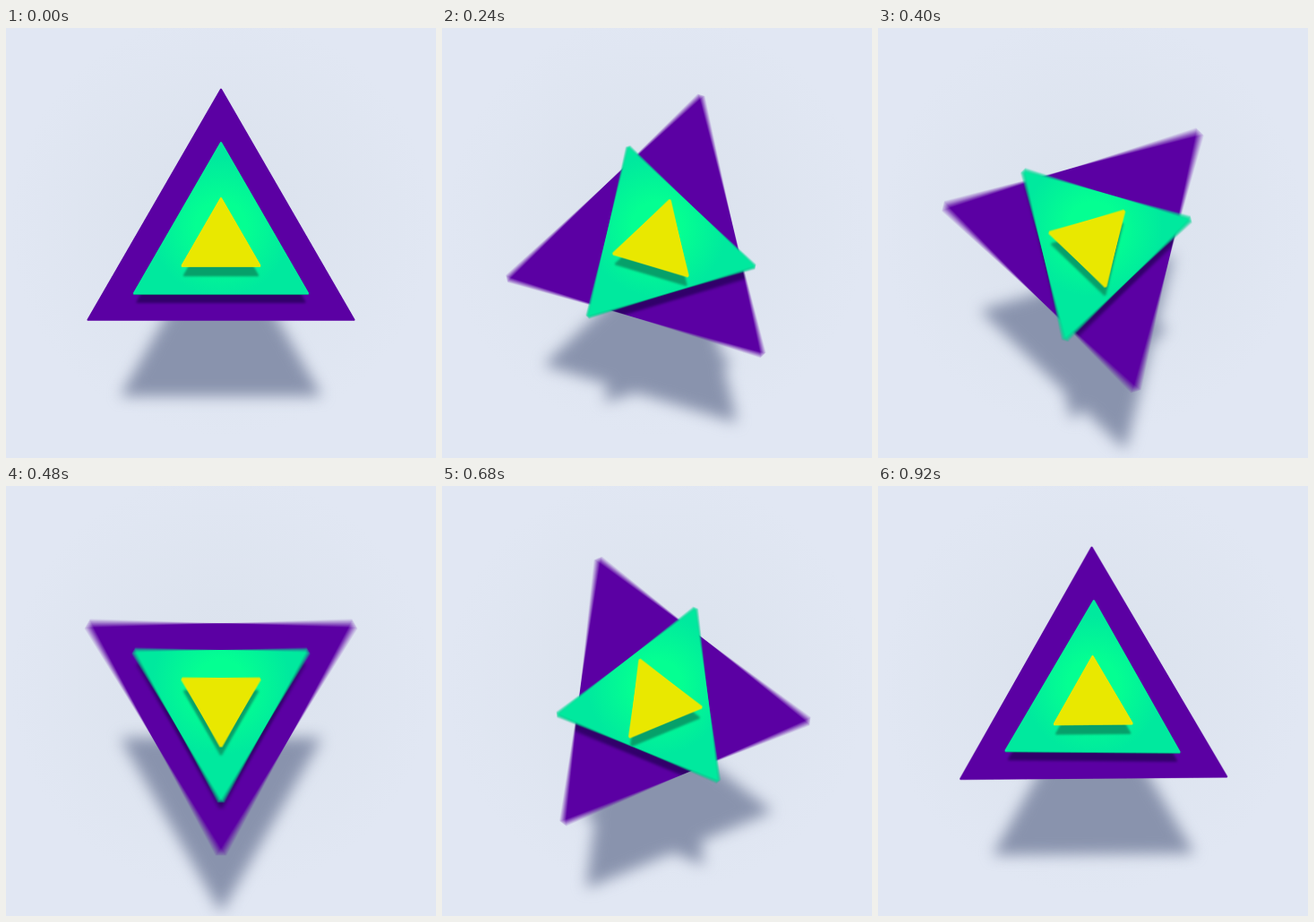
An HTML page with a canvas for the animation above (960 ms loop, 480 px wide and 480 px high).

```html
<!DOCTYPE html>
<html lang="en">
<head>
<meta charset="utf-8">
<title>Counter-rotating triangles</title>
<style>
  html, body { margin: 0; width: 100%; height: 100%; overflow: hidden; background: #e0e6f2; }
  canvas { display: block; width: 480px; height: 480px; }
</style>
</head>
<body>
<canvas id="stage" width="480" height="480"></canvas>
<script>
const SIZE = 480, MID = 240;
const LOOP = 960, STEP = 40, SHUTTER = 20, SAMPLES = 16;
const TURN = Math.PI * 2 / 3;

const ctx = document.getElementById('stage').getContext('2d');
const newLayer = () => {
  const c = document.createElement('canvas');
  c.width = c.height = SIZE;
  return c.getContext('2d');
};
const face = newLayer(), shade = newLayer();

// Symmetric cubic ease: cubic-bezier(.39, 0, .61, 1)
function ease(x) {
  let lo = 0, hi = 1;
  for (let i = 0; i < 24; i++) {
    const s = (lo + hi) / 2, r = 1 - s;
    if (1.17 * s * r * r + 1.83 * s * s * r + s * s * s < x) lo = s; else hi = s;
  }
  return lo * lo * (3 - 2 * lo);
}

function angleAt(ms) {
  const u = ms / LOOP, turns = Math.floor(u);
  return TURN * (turns + ease(u - turns));
}

function anglesAround(ms) {
  return Array.from({ length: SAMPLES }, (_, i) =>
    angleAt(ms + ((i + 0.5) / SAMPLES - 0.5) * SHUTTER));
}

function addTriangle(g, cy, radius, angle) {
  const r = radius - 2;
  g.beginPath();
  for (let i = 0; i < 3; i++) {
    const a = angle - Math.PI / 2 + i * TURN;
    g.lineTo(MID + r * Math.cos(a), cy + r * Math.sin(a));
  }
  g.closePath();
  g.fill();
  g.stroke();
}

function clear(g) {
  g.globalCompositeOperation = 'source-over';
  g.globalAlpha = 1;
  g.clearRect(0, 0, SIZE, SIZE);
}

// Adds up evenly weighted poses, each a list of [cy, radius, direction].
function smear(g, angles, parts) {
  clear(g);
  g.globalCompositeOperation = 'lighter';
  g.lineJoin = 'round';
  g.lineWidth = 2;
  g.fillStyle = g.strokeStyle = '#000';
  for (const a of angles) {
    clear(pose);
    pose.lineJoin = 'round';
    pose.lineWidth = 2;
    for (const [cy, radius, dir] of parts) addTriangle(pose, cy, radius, a * dir);
    g.globalAlpha = 1 / SAMPLES;
    g.drawImage(pose.canvas, 0, 0);
  }
  g.globalAlpha = 1;
}
const pose = newLayer();

function tint(g, paint) {
  g.globalCompositeOperation = 'source-in';
  g.fillStyle = paint;
  g.fillRect(0, 0, SIZE, SIZE);
}

function radial(x, y, r0, r1, inner, outer) {
  const grad = ctx.createRadialGradient(x, y, r0, x, y, r1);
  grad.addColorStop(0, inner);
  grad.addColorStop(1, outer);
  return grad;
}

const backdrop = radial(MID, 220, 60, 235, '#dce3ee', '#e1e7f3');
const greenPaint = radial(MID, 222, 28, 78, '#04ff92', '#00e99e');

const plates = [
  { radius: 173.5, dir: 1, paint: '#5b00a3',
    cast: { cy: 252, radius: 110, dir: -1, paint: '#31006a', blur: 1.8 } },
  { radius: 114, dir: -1, paint: greenPaint, edge: '#00b981',
    cast: { cy: 252.5, radius: 49.5, dir: 1, paint: '#06a06a', blur: 1.3 } },
  { radius: 52, dir: 1, paint: '#e9e800', edge: '#f6ee00' }
];

function drawPlate(angles, { radius, dir, paint, edge, cast }) {
  smear(face, angles, [[MID, radius, dir]]);
  if (edge) {
    tint(face, edge);
    ctx.drawImage(face.canvas, 0, 0.8);
  }
  tint(face, paint);
  if (cast) {
    smear(shade, angles, [[cast.cy, cast.radius, cast.dir]]);
    tint(shade, cast.paint);
    face.globalCompositeOperation = 'source-atop';
    face.filter = `blur(${cast.blur}px)`;
    face.drawImage(shade.canvas, 0, 0);
    face.filter = 'none';
  }
  ctx.drawImage(face.canvas, 0, 0);
}

function draw(ms) {
  const angles = anglesAround(ms);
  ctx.fillStyle = backdrop;
  ctx.fillRect(0, 0, SIZE, SIZE);

  smear(shade, angles, [[346, 130, 1], [355, 86, -1]]);
  tint(shade, '#8993ad');
  ctx.filter = 'blur(8px)';
  ctx.drawImage(shade.canvas, 0, 0);
  ctx.filter = 'none';

  for (const plate of plates) drawPlate(angles, plate);
}

const start = performance.now();
let shown = -1;
function tick() {
  const elapsed = performance.now() - start + 4;
  const step = Math.floor(elapsed / STEP) % (LOOP / STEP);
  if (step !== shown) {
    shown = step;
    draw(step * STEP);
  }
  requestAnimationFrame(tick);
}
tick();
</script>
</body>
</html>
```
